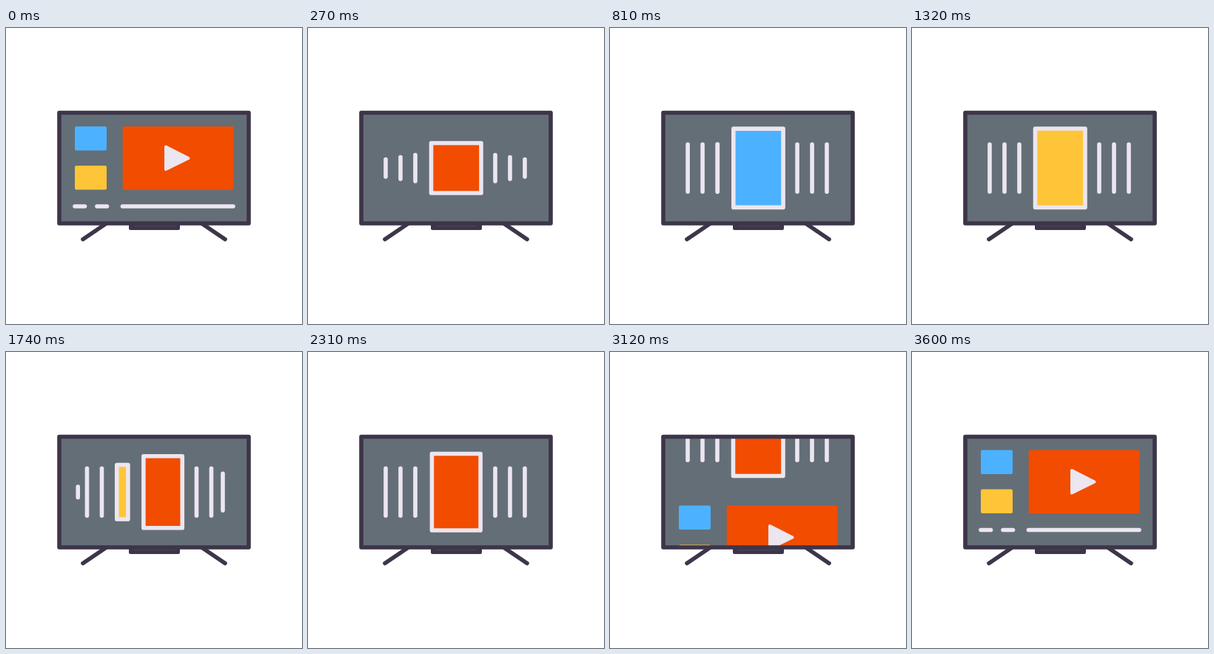
These frames come from a looping animation (400 px wide and 400 px high, 5.63 s). An HTML page with a canvas:

```html
<!DOCTYPE html>
<html lang="en">
<head>
<meta charset="utf-8">
<title>Smart TV</title>
<style>
  html, body { margin: 0; height: 100%; overflow: hidden; background: #fff; }
  canvas { display: block; width: 100vmin; height: 100vmin; }
</style>
</head>
<body>
<canvas id="stage" width="400" height="400"></canvas>
<script>
const ctx = document.getElementById('stage').getContext('2d');
const LOOP = 5630, STEP = 30, PAGE = 150, MID_Y = 189.25;
const DARK = '#3d3549', SCREEN = '#646e76', LIGHT = '#ebe6ef';
const RED = '#f24c00', BLUE = '#4cb2ff', YELLOW = '#ffc538';
const CARDS = [RED, BLUE, YELLOW, RED, BLUE, YELLOW, RED];

const progress = (t, start, length) => Math.min(1, Math.max(0, (t - start) / length));
const inOut = x => (1 - Math.cos(Math.PI * x)) / 2;
const out = x => 1 - (1 - x) ** 2;
const mix = (a, b, x) => a + (b - a) * x;

function line(x1, y1, x2, y2, color) {
  ctx.strokeStyle = color;
  ctx.beginPath();
  ctx.moveTo(x1, y1);
  ctx.lineTo(x2, y2);
  ctx.stroke();
}

function box(x, y, w, h, color, r = 2) {
  ctx.fillStyle = color;
  ctx.beginPath();
  ctx.roundRect(x, y, w, h, r);
  ctx.fill();
}

function drawMenu(y) {
  ctx.save();
  ctx.translate(0, y);
  box(93, 133, 43, 32.5, BLUE);
  box(93, 186, 43, 32.5, YELLOW);
  box(157.7, 133, 150, 85.7, RED);
  for (const [x1, x2] of [[93, 106.5], [123, 136.5], [157.5, 307]]) line(x1, 241, x2, 241, LIGHT);
  ctx.fillStyle = ctx.strokeStyle = LIGHT;
  ctx.lineWidth = 4;
  ctx.beginPath();
  ctx.moveTo(216, 160.5);
  ctx.lineTo(246.5, 176);
  ctx.lineTo(216, 191);
  ctx.closePath();
  ctx.fill();
  ctx.stroke();
  ctx.restore();
}

// Left edge, right edge and height of a card at a whole slot; 0 is the open one.
function slot(p) {
  if (p === 0) return [166.5, 234, 106.5];
  const x = p < 0 ? Math.max(165 + 20 * p, 95) : Math.min(233 + 20 * p, 293);
  return [x, x, Math.abs(p) > 3 ? 0 : 64];
}

function drawCard(t, p, color) {
  const low = Math.floor(p), a = slot(low), b = slot(low + 1);
  let [left, right, height] = a.map((v, i) => mix(v, b[i], p - low));
  height *= out(progress(t, 122 + 24 * Math.min(3, Math.abs(p)), 375));
  if (height < 0.5) return;
  const open = 1 - Math.min(1, Math.abs(p));
  const press = 1 - 0.12 * open * Math.sin(Math.PI * progress(t, 2288, 300));
  const mid = (left + right) / 2, w = (right - left) * press, h = height * press;
  ctx.fillStyle = color;
  ctx.strokeStyle = LIGHT;
  ctx.beginPath();
  if (w < 0.1) {
    ctx.moveTo(mid, MID_Y - h / 2);
    ctx.lineTo(mid, MID_Y + h / 2);
  } else {
    ctx.rect(mid - w / 2, MID_Y - h / 2, w, h);
    ctx.fill();
  }
  ctx.stroke();
}

function drawGallery(t, y) {
  const shift = [565, 1060, 1565].reduce((sum, start) => sum + inOut(progress(t, start, 255)), 0);
  ctx.save();
  ctx.translate(0, y);
  for (let i = -3; i <= 6; i++) {
    const p = i - shift;
    if (Math.abs(p) < 4) drawCard(t, p, CARDS[(i + 3) % 3]);
  }
  ctx.restore();
}

function drawStand() {
  line(135, 264.5, 104, 285.5, DARK);
  line(265, 264.5, 296, 285.5, DARK);
  box(166, 262, 69, 11, DARK);
  ctx.lineWidth = 0.8;
  line(173, 267.3, 228, 267.3, '#575163');
  ctx.lineWidth = 5.6;
}

function draw(t) {
  ctx.clearRect(0, 0, 400, 400);
  ctx.lineWidth = 5.6;
  ctx.lineCap = ctx.lineJoin = 'round';
  drawStand();
  box(72, 114.5, 256, 149.5, SCREEN);

  ctx.save();
  ctx.beginPath();
  ctx.rect(74, 117, 252, 145);
  ctx.clip();
  const slide = inOut(progress(t, 2640, 960));
  if (slide < 1) drawGallery(t, -PAGE * slide);
  if (slide > 0) {
    drawMenu(PAGE * (1 - slide) - 0.5);
  } else {
    ctx.globalAlpha = 1 - progress(t, 10, 130);
    if (ctx.globalAlpha > 0) drawMenu(0);
  }
  ctx.restore();

  ctx.strokeStyle = DARK;
  ctx.strokeRect(72, 114.5, 256, 149.5);
}

function tick() {
  const t = performance.now() % LOOP;
  draw(Math.floor(t / STEP) * STEP);
  requestAnimationFrame(tick);
}
tick();
</script>
</body>
</html>
```
